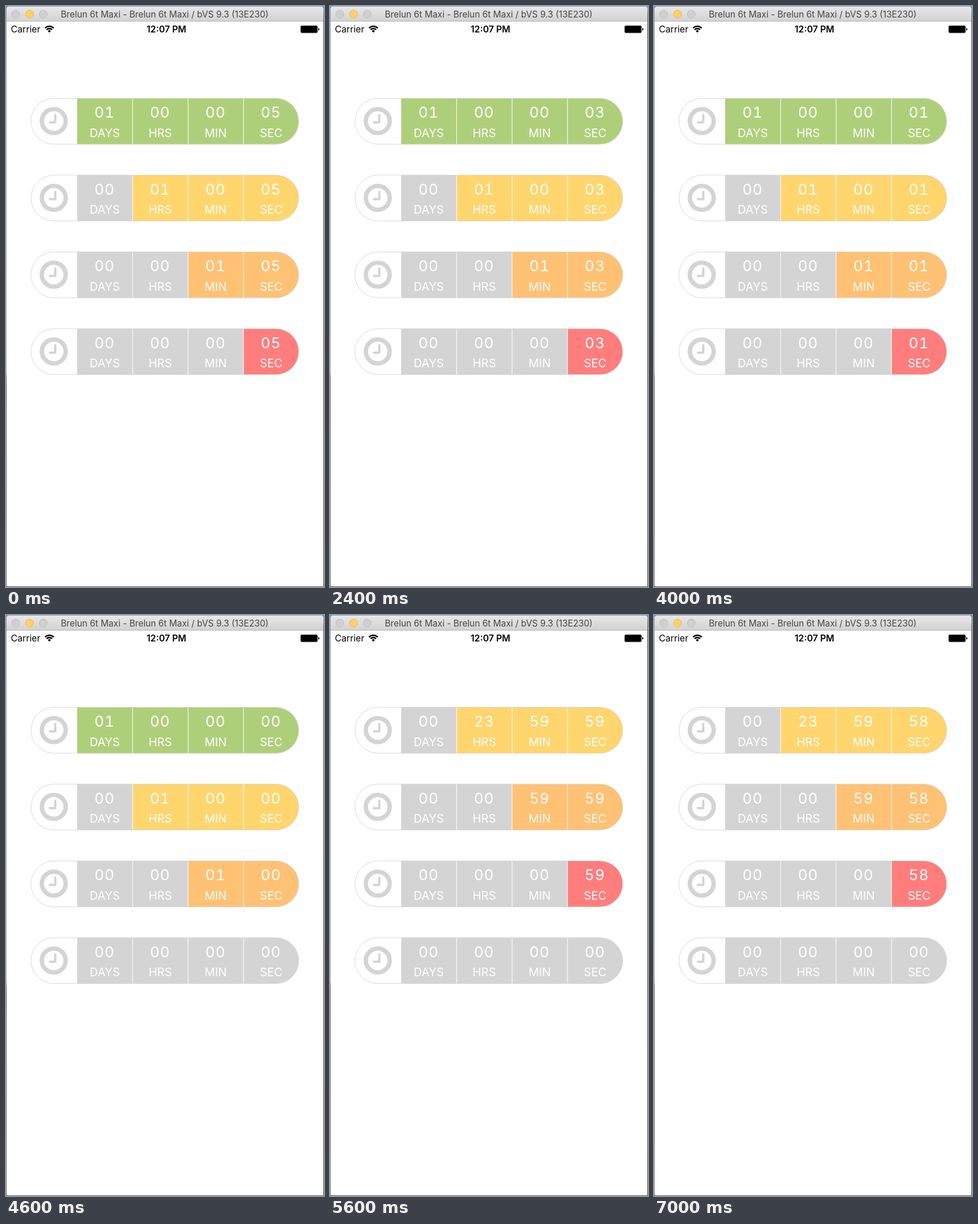
Animation of 554 by 1010 pixels, one loop 7200 ms. Source, as an HTML page:

```html
<!DOCTYPE html>
<html lang="en">
<head>
<meta charset="utf-8">
<title>Countdown timers</title>
<style>
  html, body { margin: 0; width: 100%; height: 100%; overflow: hidden; background: #fff; }
  svg { display: block; width: 100vw; height: 100vh; }
  text { font-family: Inter, "Open Sans", sans-serif; }
  .num, .label { fill: #fff; text-anchor: middle; }
  .num { font-size: 26px; letter-spacing: .8px; font-feature-settings: "tnum"; }
  .label { font-size: 20px; }
</style>
</head>
<body>
<svg id="stage" viewBox="0 0 554 1010" xmlns="http://www.w3.org/2000/svg">
  <defs>
    <linearGradient id="bar" x2="0" y2="1">
      <stop stop-color="#e9e8e9"/>
      <stop offset="1" stop-color="#d3d2d3"/>
    </linearGradient>
    <linearGradient id="edge" x2="0" y2="1">
      <stop stop-color="#6f9ac6"/>
      <stop offset=".63" stop-color="#8fa3b8"/>
      <stop offset=".64" stop-color="#55565a"/>
      <stop offset="1" stop-color="#66686c"/>
    </linearGradient>
    <linearGradient id="edgeR" x2="0" y2="1">
      <stop stop-color="#6f9ac6"/>
      <stop offset=".03" stop-color="#3c434c"/>
      <stop offset="1" stop-color="#3a3b3e"/>
    </linearGradient>
    <clipPath id="pill"><rect x="43.5" y="160.5" width="466.5" height="80" rx="40"/></clipPath>
    <g id="clock" fill="none" stroke="#d4d4d4">
      <circle cx="83.2" cy="200" r="20.8" stroke-width="7.6"/>
      <path d="M85.8 189.5V202.3H76.5" stroke-width="4" stroke-linecap="round" stroke-linejoin="round"/>
    </g>
  </defs>

  <rect width="277" height="1010" fill="url(#edge)"/>
  <rect x="277" width="277" height="1010" fill="url(#edgeR)"/>
  <rect width="554" height="6" fill="#6f9ac6"/>
  <rect y="1008" width="554" height="2" fill="#4c4d50"/>
  <path d="M1 1009V6Q1 1 6 1H548Q553 1 553 6V1009Z" fill="#fff"/>
  <path d="M1 26V6Q1 1 6 1H548Q553 1 553 6V26Z" fill="url(#bar)"/>
  <rect x="1" y="26" width="552" height="1" fill="#b5b4b5"/>

  <g stroke-width="1">
    <circle cx="17" cy="14" r="6.8" fill="#d1d0d1" stroke="#bcbbbc"/>
    <circle cx="41" cy="14" r="6.8" fill="#ffd160" stroke="#e5b853"/>
    <circle cx="65" cy="14" r="6.8" fill="#d1d0d1" stroke="#bcbbbc"/>
  </g>
  <text x="276.5" y="19.7" font-size="15.3" text-anchor="middle" fill="#464646">Brelun 6t Maxi - Brelun 6t Maxi / bVS 9.3 (13E230)</text>

  <text x="8.5" y="46.3" font-size="15.7">Carrier</text>
  <g fill="none" stroke="#000" stroke-width="2.5">
    <path d="M67.9 38.4A10.75 10.75 0 0 1 83.1 38.4"/>
    <path d="M70.7 41.2A6.8 6.8 0 0 1 80.3 41.2"/>
  </g>
  <path d="M75.5 46.2L72.8 43.4A3.8 3.8 0 0 1 78.2 43.4Z"/>
  <text x="279.5" y="46.3" font-size="15.7" font-weight="600" text-anchor="middle">12:07 PM</text>
  <rect x="512.8" y="33.8" width="30.4" height="13.4" rx="2.6" fill="#8a8a8a"/>
  <rect x="513.6" y="34.6" width="28.8" height="11.8" rx="1.8"/>
  <path d="M544 38.2Q545.9 38.8 545.9 40.5T544 42.8Z"/>

  <g id="rows"></g>
</svg>
<script>
const LOOP = 7200, FIRST_TICK = 600, SECOND = 1000;
const GRAY = '#d4d4d4';
const COLORS = ['#aecf7a', '#ffd56e', '#ffc174', '#ff7d7d'];
const LABELS = ['DAYS', 'HRS', 'MIN', 'SEC'];
const STARTS = [86405, 3605, 65, 5];
const CELL_X = 124, CELL_W = 96.6, ROW_STEP = 133.5;

function add(parent, tag, attrs, text) {
  const el = document.createElementNS('http://www.w3.org/2000/svg', tag);
  for (const key in attrs) el.setAttribute(key, attrs[key]);
  if (text) el.textContent = text;
  return parent.appendChild(el);
}

function buildRow(start, i) {
  const row = add(document.getElementById('rows'), 'g', { transform: `translate(0 ${i * ROW_STEP})` });
  add(row, 'use', { href: '#clock' });
  const body = add(row, 'g', { 'clip-path': 'url(#pill)' });
  const cells = LABELS.map((label, c) => {
    const x = CELL_X + c * CELL_W, mid = x + CELL_W / 2;
    const box = add(body, 'rect', { x, y: 160, width: CELL_W, height: 81 });
    if (c) add(body, 'rect', { x: x - .5, y: 160, width: 1, height: 81, fill: '#fff' });
    const num = add(row, 'text', { class: 'num', x: mid - .6, y: 194 });
    add(row, 'text', { class: 'label', x: mid - .2, y: 227.5 }, label);
    return { box, num };
  });
  add(row, 'rect', {
    x: 43.5, y: 160.5, width: 466.5, height: 79.7, rx: 39.85,
    fill: 'none', stroke: GRAY, 'stroke-width': .9
  });
  return { start, cells };
}

const rows = STARTS.map(buildRow);

function split(s) {
  return [Math.floor(s / 86400), Math.floor(s / 3600) % 24, Math.floor(s / 60) % 60, s % 60];
}

let shown = -1;
function draw(t) {
  const ticks = Math.max(0, Math.floor((t - FIRST_TICK) / SECOND) + 1);
  if (ticks === shown) return;
  shown = ticks;
  for (const { start, cells } of rows) {
    const parts = split(Math.max(0, start - ticks));
    const lead = parts.findIndex(v => v > 0);
    cells.forEach(({ box, num }, c) => {
      box.setAttribute('fill', lead >= 0 && c >= lead ? COLORS[lead] : GRAY);
      num.textContent = String(parts[c]).padStart(2, '0');
    });
  }
}

const origin = performance.now();
function frame() {
  draw((performance.now() - origin) % LOOP);
  requestAnimationFrame(frame);
}
frame();
</script>
</body>
</html>
```
